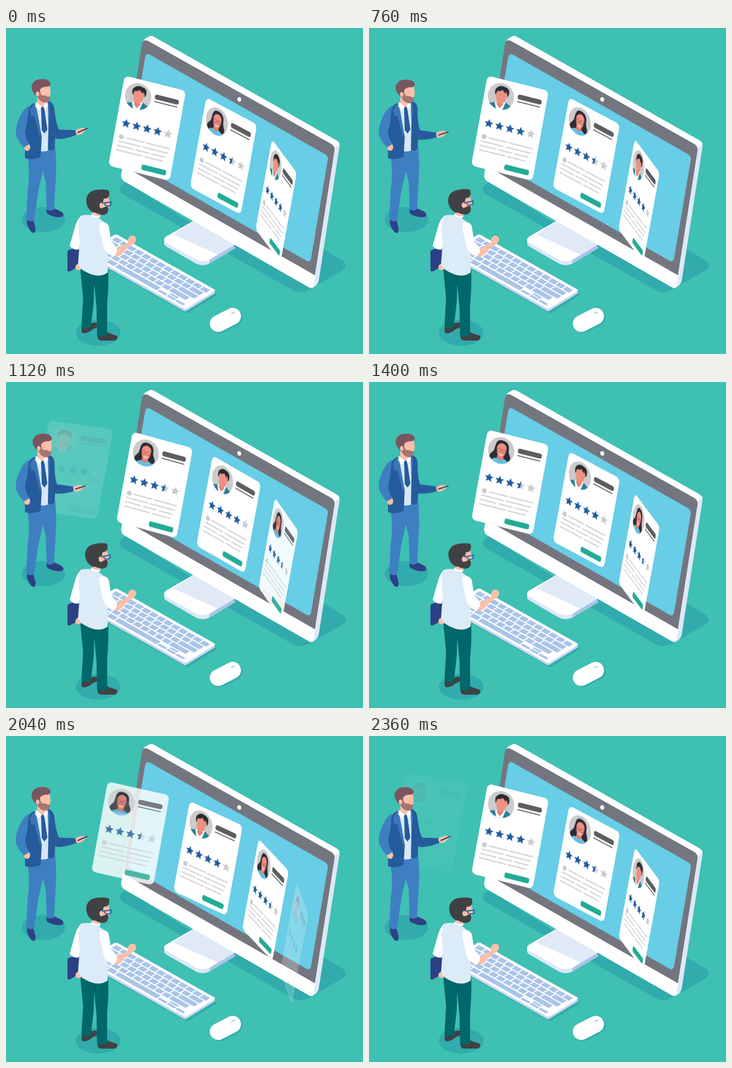
An HTML page without scripts that plays this animation: 639 by 584 pixels, repeating every 2.4 s.

```html
<!DOCTYPE html>
<html lang="en">
<head>
<meta charset="utf-8">
<title>Profile reviews</title>
<style>
html, body { margin: 0; width: 100%; height: 100%; overflow: hidden; background: #3ec0b3; }
svg { display: block; width: 100vw; height: 100vh; }

/* Each card walks through five places, one step every 1.2 s.
   Its shapes fade one by one, so the layers show through each other. */
.card { animation: walk 4.8s linear infinite, fade 4.8s linear infinite; }
@keyframes walk {
  0%, 15.833% { transform: translate(531px, 277px) skewX(-10.3deg) scale(.236, 1) skewY(27.9deg); }
  24.167%, 40.833% { transform: translate(476px, 199.5px) skewX(-10.3deg) scale(.504, 1) skewY(28.6deg); }
  49.167%, 65.833% { transform: translate(358.5px, 124.5px) skewX(-10.3deg) scale(.907, 1) skewY(23.8deg); }
  74.167%, 90.833% { transform: translate(212.5px, 85.3px) skewX(-10.3deg) scale(1.041, 1) skewY(14.04deg); }
  99.167%, 100% { transform: translate(62.4px, 67px) skewX(-10.3deg) scale(1.075, 1) skewY(7.75deg); }
}
@keyframes fade {
  0%, 15.833% { fill-opacity: 0; stroke-opacity: 0; }
  24.167%, 90.833% { fill-opacity: 1; stroke-opacity: 1; }
  99.167% { fill-opacity: .04; stroke-opacity: .04; }
  100% { fill-opacity: 0; stroke-opacity: 0; }
}

.arm, .head, .nod { animation: 2.4s ease-in-out infinite; }
.arm { animation-name: arm; transform-origin: 82px 148px; }
.head { animation-name: head; }
.nod { animation-name: nod; transform-origin: 163px 335px; }
@keyframes arm {
  0%, 15%, 85%, 100% { transform: rotate(0deg); }
  27%, 73.3% { transform: rotate(6deg); }
}
@keyframes head {
  0%, 15%, 85%, 100% { transform: translate(0, 0); }
  27%, 73.3% { transform: translate(2px, 1px); }
}
@keyframes nod {
  0%, 15%, 65%, 100% { transform: rotate(0deg); }
  25%, 55% { transform: rotate(-4.5deg); }
}

.shade { fill: #32abac; }
.skin { fill: #fbbfa8; }
.navy { fill: #2c4184; }
.blue { fill: #3e7fc1; }
.deep { fill: #265b9b; }
.ice { fill: #dcebf8; }
.dark { fill: #404144; }
</style>
</head>
<body>
<svg viewBox="0 0 639 584" preserveAspectRatio="none">
<defs>
  <clipPath id="round"><circle r="23.5"/></clipPath>
  <linearGradient id="half">
    <stop offset=".5" stop-color="#215b9b"/>
    <stop offset=".5" stop-color="#cbccce"/>
  </linearGradient>
  <path id="star" d="M0-8L2.3-2.9 7.8-2.4 3.7 1.2 4.9 6.7 0 3.8-4.9 6.7-3.7 1.2-7.8-2.4-2.3-2.9Z"/>

  <g id="sheet">
    <rect width="110" height="161" rx="8" fill="#fff"/>
    <rect x="58.5" y="18.7" width="43" height="8.6" rx="4" fill="#5c5d61"/>
    <path d="M59 31.6H100" stroke="#5c5d61" stroke-width="1.9"/>
    <g fill="#215b9b">
      <use href="#star" x="17.3" y="81.5"/>
      <use href="#star" x="36.2" y="81.5"/>
      <use href="#star" x="55.1" y="81.5"/>
    </g>
    <use href="#star" x="92.8" y="81.5" fill="#cbccce"/>
    <circle cx="13.4" cy="106.2" r="4.4" fill="#cbccce"/>
    <path d="M22 106H55M59 106H100M10 114.6H49M54 114.6H98M9 122.6H37M42 122.6H66M71 122.6H95M9 130.4H55M60 130.4H92"
      stroke="#cbccce" stroke-width="2" stroke-linecap="round"/>
    <rect x="57.5" y="144.5" width="44" height="9.4" rx="3.4" fill="#22ab95"/>
  </g>

  <g id="man">
    <use href="#sheet"/>
    <use href="#star" x="74" y="81.5" fill="#215b9b"/>
    <g transform="translate(29.6 30)" clip-path="url(#round)">
      <circle r="23.5" fill="#cbcbcc"/>
      <path d="M-24 26V17L-8 12 9 8 24 15V28Z" fill="#2a8096"/>
      <path d="M-9 12L-4 25H6L10 8Z" fill="#fff"/>
      <path d="M-5 6H6V14L1 21-5 15Z" fill="#e08473"/>
      <path d="M-9-6Q-9-14 0-14 10-13 10-5 10 5 6 10 1 15-4 11-9 6-9-6Z" fill="#ee9180"/>
      <path d="M-10 0Q-14-10-9-14-4-20 4-18 15-17 13-5L11-1Q11-7 7-11L8-7Q4-8 1-12-3-8-8-8Z" fill="#2c2c31"/>
    </g>
  </g>

  <g id="woman">
    <use href="#sheet"/>
    <use href="#star" x="74" y="81.5" fill="url(#half)"/>
    <g transform="translate(29.6 30)" clip-path="url(#round)">
      <circle r="23.5" fill="#cbcbcc"/>
      <path d="M-1-18C-12-18-11-7-12 0-13 7-21 9-18 17-14 22-4 19 0 16 5 20 16 19 18 12 19 6 13 4 13-4 13-13 8-18-1-18Z" fill="#2e2c33"/>
      <path d="M-18 26Q-15 16-5 14L6 13Q16 15 18 26Z" fill="#62c0e6"/>
      <path d="M-5 6H6V14Q1 20-5 15Z" fill="#de8272"/>
      <path d="M-8-5Q-7-12 1-13 9-11 9-4 9 6 5 10 1 13-3 10-8 6-8-5Z" fill="#ee9180"/>
      <path d="M-9-1Q-9-11 0-14 9-12 10-1L12-8Q9-17 0-17-11-15-9-1Z" fill="#2e2c33"/>
      <g fill="none" stroke="#a9505a" stroke-width=".9">
        <circle cx="-4" r="3.3"/><circle cx="5" r="3.3"/><path d="M-1 0H2"/>
      </g>
      <path d="M-2 7Q1 9 4 7" fill="none" stroke="#fff" stroke-width="1.3"/>
    </g>
  </g>
</defs>

<rect width="639" height="584" fill="#3ec0b3"/>

<!-- Monitor -->
<path class="shade" d="M215 276Q197 286 208 297L512 469Q525 477 540 470L603 434Q612 426 604 418L560 391 380 380Z"/>
<path d="M283 378V386Q283 389 288 392L340 422Q352 428 364 422L411 394 386 376Z" fill="#dce8f7"/>
<path d="M364 416V422L411 394 406 387Z" fill="#a9c4e9"/>
<path d="M286 374L338 344 411 387 364 415Q352 421 340 415L286 384Q280 379 286 374Z" fill="#fff"/>
<path d="M300 370L338 344 411 387 379 406Z" fill="#e0eaf7"/>
<path d="M245 27Q246 21 251 18L256 15.500Q260 13 265 16L591 201Q598 205 597 212L560 451Q559 458 554 462L548 466 530 440 570 220Z" fill="#dce8f7"/>
<path d="M245 27Q246 21 251 18L256 15.500Q260 13 265 16L591 201Q597 205 597 208L587 215 250 30Z" fill="#fff"/>
<path d="M245 25L206 264Q206 271 212 275L541 464Q549 469 551 460L588 222 560 210Z" fill="#fff"/>
<path d="M243 30Q245 19 254 23L581 207Q589 211 588 220L553 443 210 247Z" fill="#74767f"/>
<path d="M249 53Q251 44 258 48L571 226Q577 230 576 236L546 413Q544 420 538 417L223 237Q218 234 219 228Z" fill="#68cde6"/>
<ellipse cx="417.500" cy="128" rx="3.400" ry="4.100" fill="#fff" transform="rotate(-15 417 128)"/>

<!-- Keyboard -->
<g transform="matrix(.994 .561 -1 .618 197 369)">
  <rect width="180" height="55" rx="3" class="shade" transform="translate(8 5)"/>
  <rect width="180" height="55" rx="3" fill="#c3d6ee" transform="translate(3.500 3.500)"/>
  <rect width="180" height="55" rx="3" fill="#fff"/>
  <g stroke="#a9c4e9" stroke-width="7.600">
    <path d="M5 8.500H174" stroke-dasharray="11.200 1.950"/>
    <path d="M5 18H174" stroke-dasharray="15 2 11 2 11 2 11 2 11 2 11 2 11 2 11 2 11 2 11 2 11 2 20"/>
    <path d="M5 27.500H174" stroke-dasharray="18 2 11 2 11 2 11 2 11 2 11 2 11 2 11 2 11 2 11 2 30"/>
    <path d="M5 37H174" stroke-dasharray="12 2 11 2 11 2 11 2 11 2 11 2 11 2 11 2 11 2 11 2 30"/>
    <path d="M5 47H124" stroke-dasharray="13 2 12 2 13 2 75 2"/>
    <path d="M126 49H174" stroke-width="4" stroke-dasharray="14 2"/>
    <path d="M142 44H156" stroke-width="3"/>
  </g>
</g>

<!-- Mouse -->
<g transform="rotate(-27 392.5 522.5)">
  <rect x="364.500" y="511" width="59" height="30" rx="15" class="shade"/>
  <rect x="363" y="508" width="59" height="30" rx="15" fill="#fff"/>
  <path d="M407 518H414" stroke="#a9c4e9" stroke-width="2"/>
</g>

<!-- Cards -->
<g class="card" style="animation-delay:-3.6s"><use href="#man"/></g>
<g class="card" style="animation-delay:-2.4s"><use href="#woman"/></g>
<g class="card" style="animation-delay:-1.2s"><use href="#man"/></g>
<g class="card"><use href="#woman"/></g>

<!-- Man in suit -->
<ellipse class="shade" cx="67" cy="343" rx="39" ry="22.500"/>
<path class="navy" d="M38 342Q36 350 40 357 45 368 51 367 55 363 51 352L49 343ZM73 323Q71 332 76 334 90 341 101 338 106 333 97 328L86 323Z"/>
<path class="blue" d="M39 230L88 212Q91 245 89 270L86 325Q79 329 73 325L71 275 66 256 58 291 50 345Q42 348 36 343L39 290Q43 262 39 230Z"/>
<path d="M51 134L73 130 78 150 76 219Q68 223 60 220Z" fill="#d5e7f6"/>
<path class="deep" d="M52 134Q38 138 34 162L34 233Q45 238 62 231L64 195 56 152ZM75 130Q83 132 84 141L89 180 87 215Q83 222 75 218L76 170Z"/>
<path d="M52 134L43 146 45 158 51 158 62 200 62 185 56 150ZM75 130L80 142 76 165Z" fill="#3a76b7"/>
<path class="skin" d="M32 211L41 207Q45 213 42 218 37 223 33 217Z"/>
<path class="blue" d="M41 139Q29 146 22 166 15 184 19 195 24 206 32 214L42 208Q35 198 34 187L38 168Z"/>
<path class="deep" d="M62 141L67 140 69 147 74 182 69 189 64 183 63 148Z"/>
<path class="skin" d="M56 124H71V134L65 142 56 136Z"/>
<path d="M54 133L64 141 60 148 52 140ZM72 131L67 140 70 146 75 138Z" fill="#fff"/>
<g class="head">
  <path class="skin" d="M55 103Q64 95 78 101L80 116Q79 126 70 129L57 122Z"/>
  <path d="M56 111H61Q61 121 68 121 72 120 74 123L79 123Q79 133 70 134 60 133 56 123Z" fill="#a87471"/>
  <path d="M54 122Q44 112 46 103 50 91 65 91.500 80 92 80 101 78 106 71 105 64 106 61 110L60 116Z" fill="#7a5560"/>
  <ellipse class="skin" cx="56.500" cy="118" rx="3" ry="4.300"/>
</g>
<g class="arm">
  <path class="deep" d="M77 132Q86 134 87 148 89 170 95 182L124 183 127 191Q108 199 92 199 83 196 80 176Z"/>
  <path class="skin" d="M124 184Q130 179 139 179L146 180 143 183 137 189Q131 193 126 191Z"/>
  <path d="M129 187L145 180" stroke="#31406f" stroke-width="2.200" stroke-linecap="round"/>
</g>

<!-- Man in vest -->
<ellipse class="shade" cx="165" cy="546" rx="40" ry="23"/>
<path class="dark" d="M136 536Q133 546 139 547 147 547 156 539 166 537 164 529 157 525 150 531ZM164 548Q162 559 170 560H195Q202 556 198 551 187 548 181 545Z"/>
<path d="M132 422L183 434Q184 466 181 494L181 550Q172 555 163 551L162 500 158 458 157 491 152 535Q144 541 135 536L138 484Z" fill="#00676a"/>
<path d="M159 442L158 460" stroke="#00545a"/>
<path class="navy" d="M110 401Q110 398 114 397L133 391V426L114 436Q110 437 110 433Z"/>
<path class="skin" d="M125 425Q130 420 134 423V433Q127 435 124 431Z"/>
<path d="M138 335Q128 339 123 358L114 390Q119 398 130 397L138 370Z" fill="#fff"/>
<path class="skin" d="M195 397L218 385Q217 374 225 372 233 371 233 380 231 387 222 390L203 408Q197 412 192 407Z"/>
<path class="ice" d="M133 337Q155 329 176 348 185 363 182 391L182 438Q167 449 145 438 130 431 129 422L132 382Q127 355 133 337Z"/>
<path d="M167 350Q179 344 184 355L188 381 198 394Q201 402 193 409 181 407 175 394L168 363Z" fill="#fff"/>
<path class="skin" d="M155 326H169V336Q162 341 155 335Z"/>
<path d="M153 332Q160 339 169 336L168 340Q157 341 152 336Z" fill="#fff"/>
<g class="nod">
  <path class="skin" d="M166 302H183L186 316 183 325 168 326Z"/>
  <path class="dark" d="M155 330Q143 323 143.500 307 146 292 162 290 176 288 184 291 187 300 181 305L175 306 173 314 174 322Q182 317 183 322 184 334 174 335 165 334 161 331Z"/>
  <ellipse class="skin" cx="171" cy="318" rx="3.800" ry="5"/>
  <path d="M172 314L187 312M177 312V317Q182 321 188 317V310" fill="none" stroke="#2b61a3" stroke-width="1.800"/>
</g>
</svg>
</body>
</html>
```
